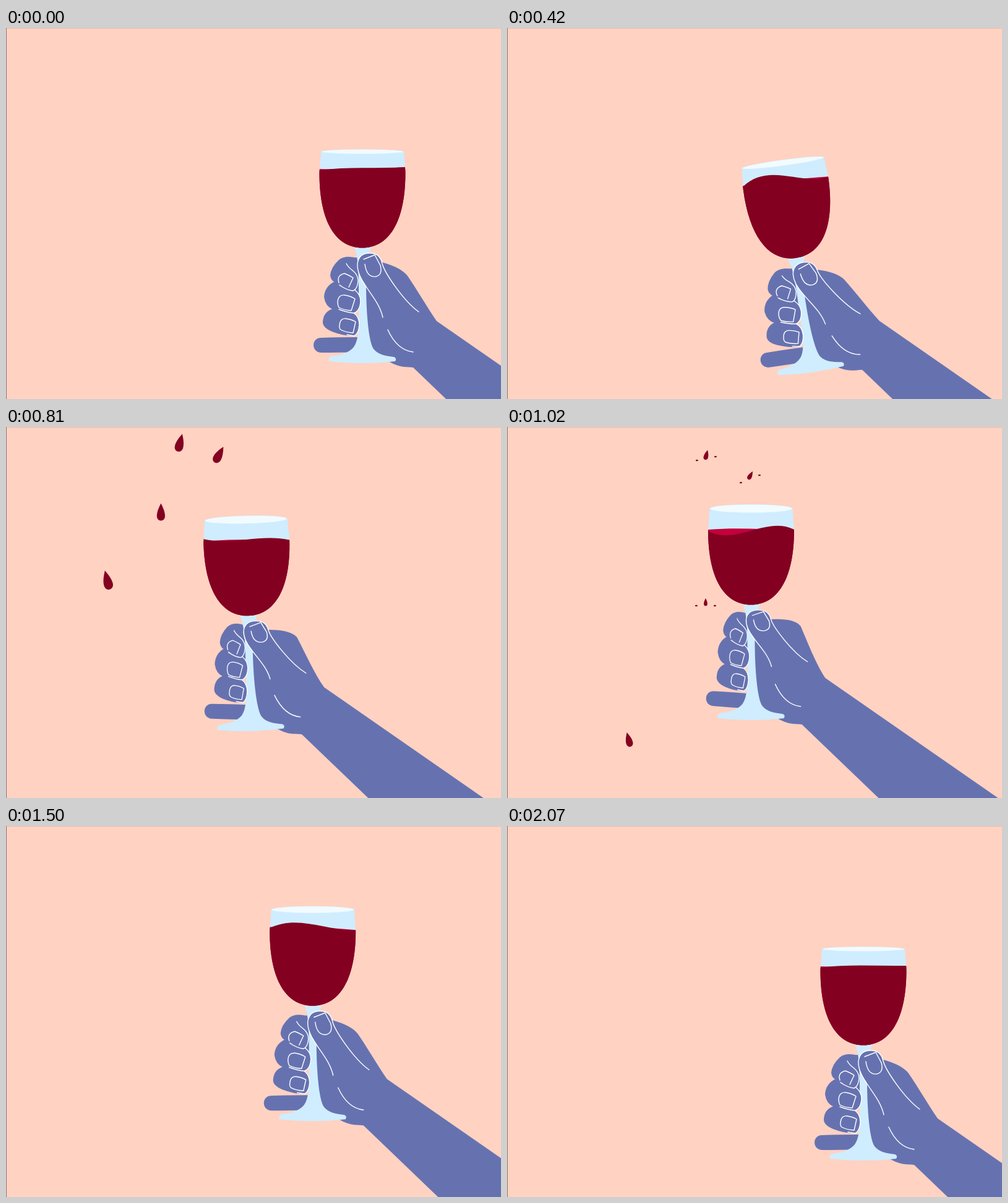
These frames come from a looping animation (800x600 px, 2100 ms). An HTML page with a canvas:

```html
<!DOCTYPE html>
<html lang="en">
<head>
<meta charset="utf-8">
<title>Wine glass</title>
<style>
  html, body { margin: 0; width: 100%; height: 100%; overflow: hidden; background: #ffd2c2; }
  canvas { display: block; }
</style>
</head>
<body>
<canvas id="stage" width="800" height="600"></canvas>
<script>
const ctx = document.getElementById('stage').getContext('2d');
const LOOP = 2100, STEP = 30;
const SKIN = '#6672b0', GLASS = '#cfedfe', RIM = '#f2fbff', WINE = '#840021', BACK = '#c3003c';

const lerp = (a, b, q) => a + (b - a) * q;
const clamp = q => Math.min(1, Math.max(0, q));
const ease = q => (q = clamp(q), q * q * (3 - 2 * q));
const pulse = (t, from, peak, to) =>
  ease((t - from) / (peak - from)) * (1 - ease((t - peak) / (to - peak)));
const bezier = (a, b, c, d, u) => {
  const v = 1 - u;
  return v * v * v * a + 3 * v * v * u * b + 3 * v * u * u * c + u * u * u * d;
};

// time and place of the rim centre
const SWING = [
  [0, 576, 200], [420, 446, 218], [630, 387, 172], [1020, 394.5, 132],
  [1260, 416, 114], [1710, 558, 164], [2070, 576, 199]
];

// Monotone cubic path through the key points
function swing(t, c) {
  const last = SWING.length - 1;
  const slope = k => (SWING[k + 1][c] - SWING[k][c]) / (SWING[k + 1][0] - SWING[k][0]);
  const tangent = k => {
    if (k === 0 || k === last) return 0;
    const a = slope(k - 1), b = slope(k);
    return a * b <= 0 ? 0 : Math.sign(a) * Math.min(Math.abs(a + b) / 2, 3 * Math.abs(a), 3 * Math.abs(b));
  };
  let i = 0;
  while (i < last - 1 && t >= SWING[i + 1][0]) i++;
  const [p, n] = [SWING[i], SWING[i + 1]], h = (n[0] - p[0]) / 3;
  return bezier(p[c], p[c] + tangent(i) * h, n[c] - tangent(i + 1) * h, n[c], clamp((t - p[0]) / h / 3));
}

// Shapes are drawn around an upright glass whose rim centre is 576, 200
const shape = d => new Path2D(d);
const palm = c => shape(`M552 372L570 371L608 379Q${638 + 8 * c} ${387 - 10 * c} ${649 + 7 * c} ${401 - 11 * c}
  C${664 + 3 * c} ${423 - 8 * c} 681 452 696 474L658 549C644 548 636 549 620 540L576 532L574 440L552 400Z`);
const littleFinger = shape('M509 501Q535 500 572 500V524Q535 525 510 525C493 525 493 501 509 501Z');
const bowl = shape('M509 200L507.5 222Q506.5 229 506.5 235C506.5 315 534 355.500 576 355.500C618 355.500 645.500 315 645.500 235Q645.500 229 644.500 222L643 200Z');
const stem = shape('M562 352C569 370 570 390 570 420V480C569 502 566 514 558 520C548 528 533 530 525 531Q520 534 522 539Q548 542 576 542Q604 542 629 539Q632 534 627 532C612 530 601 528 594 519C586 508 582 460 582 415C582 390 584 372 591 352Z');
const fingers = shape(
  'M566 372C556 369 545 369 538 375Q525 387 524 400Q525 408 531 411L560 425Q568 423 569 409Q568 399 561 392Z' +
  'M531 410Q515 418 514 435Q516 450 528 455L562 461Q573 456 573 442Q572 430 564 424L540 416Z' +
  'M528 454Q513 459 512 475Q511 484 527 491Q545 498 561 498Q571 494 571 480Q570 466 562 461L540 456Z');
const fingerLines = shape(
  'M550 381Q553 387 560 392Q569 399 569 409Q568 422 561 425Q551 424 539 416' +
  'M564 424Q573 431 573 442Q572 458 562 461Q551 460 538 455' +
  'M562 461Q571 467 571 480Q570 494 563 498L551 496' +
  'M538 412Q534 400 547 397Q553 399 561 404L554 419' +
  'M536 443Q537 431 547 432Q556 433 564 438L558 457Q545 456 538 452Q536 448 536 443Z' +
  'M539 481Q540 469 549 470Q558 471 565 475L561 493Q548 492 541 488Q538 485 539 481Z');
const thumbEdge = 'M609 468C604 446 589 430 580 415Q567 396 568 381C570 366 580 364 588 364C600 364 606 371 608 381C612 396 642 441 667 459';
const thumb = shape(thumbEdge);
const thumbLines = shape(thumbEdge + 'M578 374L596 367L605 384Q609 399 598 402Q583 404 580 382');
const wristLine = shape('M617 488Q632 521 658 524');
const drop = shape('M0 -1.4C.25 -.9 .6 -.2 .58 .45C.55 1.3 -.55 1.3 -.58 .45C-.6 -.2 -.25 -.9 0 -1.4Z');

// Where each drop of the broken stream ends up, and its size there
const DROPS = [[197, 507, 9.5], [321, 284, 5], [322, 46, 6.5], [393, 79, 6]];

function fill(path, color) {
  ctx.fillStyle = color;
  ctx.fill(path);
}

function lines(path) {
  ctx.strokeStyle = '#fff';
  ctx.lineWidth = 1.4;
  ctx.lineCap = ctx.lineJoin = 'round';
  ctx.stroke(path);
}

function ellipse(x, y, rx, ry, color) {
  ctx.beginPath();
  ctx.ellipse(x, y, rx, ry, 0, 0, 7);
  ctx.fillStyle = color;
  ctx.fill();
}

function moved(paint, ...steps) {
  ctx.save();
  for (const [how, ...args] of steps) ctx[how](...args);
  paint();
  ctx.restore();
}

function liquid(left, a, b, right, color) {
  ctx.beginPath();
  ctx.moveTo(506, 200 + left);
  ctx.bezierCurveTo(553, 200 + a, 599, 200 + b, 646, 200 + right);
  ctx.lineTo(646, 360);
  ctx.lineTo(506, 360);
  ctx.fillStyle = color;
  ctx.fill();
}

// The surface sloshes to and fro and is pulled over the lip by the spill
function drawWine(t, curl) {
  const slosh = 4 + 29 * pulse(t, 0, 420, 720) - 37 * pulse(t, 630, 1020, 1250) + 17 * pulse(t, 1050, 1500, 2100);
  const spill = pulse(t, 470, 630, 850);
  const left = 30 + 6 * curl, right = 25 + 9 * Math.sqrt(Math.sin(Math.PI * t / LOOP)) + 10 * spill;
  liquid(left - 2 + 8 * spill, 30 + 10 * spill, 28 + 6 * curl, right, BACK);
  liquid(left - 57 * spill, 28 - slosh + 10 * spill, 26 + .45 * slosh + 30 * spill, right, WINE);
}

const streamAt = u => [bezier(352, 318, 262, 221, u), bezier(212, 140, 138, 167, u)];
const streamRadius = u => 16.5 - 3.5 * Math.cos(2 * Math.PI * (u - .25)) + 8 * (1 - u) ** 8;

// Drops leave the stream at even distances and fall in arcs
function dropShift(i, t) {
  const [x, y] = streamAt(1 - .2 * i), [endX, endY] = DROPS[i];
  let q = Math.max(0, (t - 630) / 390);
  if (q > 1 && i) q = 1 + (q - 1) * .3;
  const arc = 4 * q * (1 - q);
  return [(endX - x) * q - (46 - 15 * i) * arc, (endY - y) * q - 75 * arc];
}

function drawStream(t, x, y) {
  const grow = clamp((t - 470) / 160), thin = clamp(1 - (t - 630) / 120);
  if (!grow || !thin) return;
  const shiftAt = i => i > 3 || t <= 630 ? [x - 387, y - 172] : dropShift(i, t);
  for (let u = 0; u <= grow; u += .01) {
    const [px, py] = streamAt(u), i = Math.min(4, (1 - u) * 5), k = Math.floor(i);
    const a = shiftAt(k), b = shiftAt(k + 1), r = streamRadius(u) * thin;
    ellipse(px + lerp(a[0], b[0], i - k), py + lerp(a[1], b[1], i - k), r, r, WINE);
  }
}

function drawDrops(t) {
  if (t <= 630) return;
  DROPS.forEach(([endX, endY, size], i) => {
    const r = lerp(14, size, ease((t - 690) / 330)) * (1 - ease((t - 1020) / 150));
    const [x, y] = streamAt(1 - .2 * i), [dx, dy] = dropShift(i, t);
    moved(() => fill(drop, WINE), ['translate', x + dx, y + dy], ['rotate', .25 * (i - 1)], ['scale', r, r]);

    // a few specks drift away from every drop but the falling one
    if (!i || t < 930 || t > 1300) return;
    const q = (t - 1020) / 240, speck = lerp(1.7, .9, clamp(q));
    for (const side of [-1, 1]) {
      const px = endX + side * lerp(15, 5, q) - 35 * q;
      const py = lerp(endY, 110, .15 * q) + 5 - side * (i - 1) * 3;
      ellipse(px, py, speck * 1.2, speck * .8, WINE);
    }
  });
}

// The forearm keeps its direction while the wrist follows the glass
function drawArm(x, y, angle) {
  const place = (px, py) => {
    const c = Math.cos(angle), s = Math.sin(angle), u = px - 576, v = py - 200;
    return [x + u * c - v * s, y + u * s + v * c];
  };
  const top = place(696, 474), low = place(658, 549);
  ctx.beginPath();
  for (const p of [place(630, 480), top, [top[0] + 400, top[1] + 278],
    [low[0] + 400, low[1] + 384], low]) ctx.lineTo(...p);
  ctx.fillStyle = SKIN;
  ctx.fill();
}

function drawHandAndGlass(t, curl) {
  moved(() => fill(littleFinger, SKIN),
    ['translate', 576 + 6 * curl, 512], ['rotate', curl * .087], ['translate', -576, -512]);
  fill(palm(curl), SKIN);
  fill(stem, GLASS);
  fill(bowl, GLASS);

  const rim = 3.8 + 3.2 * Math.sin(Math.PI * t / LOOP) ** 2;
  ellipse(576, 200, 67, rim, GLASS);
  ellipse(576, 200, 66, rim - .4, RIM);
  moved(() => drawWine(t, curl), ['clip', bowl]);

  moved(() => {
    fill(fingers, SKIN);
    lines(fingerLines);
  }, ['translate', 576, -3 * curl], ['scale', 1 - .13 * curl, 1], ['translate', -576, 0]);

  moved(() => {
    fill(thumb, SKIN);
    lines(thumbLines);
  }, ['translate', 0, 364], ['scale', 1, 1 - .12 * curl], ['translate', 0, -364]);
  moved(() => lines(wristLine), ['translate', -2 * curl, -4 * curl]);
}

function draw(t) {
  const x = swing(t, 1), y = swing(t, 2);
  const angle = -7.7 * pulse(t, 0, 420, 950) * Math.PI / 180;
  const curl = pulse(t, 360, 1020, 1500);
  ctx.fillStyle = '#ffd2c2';
  ctx.fillRect(0, 0, 800, 600);

  drawArm(x, y, angle);
  moved(() => drawHandAndGlass(t, curl), ['translate', x, y], ['rotate', angle], ['translate', -576, -200]);
  drawStream(t, x, y);
  drawDrops(t);

  ctx.fillStyle = '#e6bdaf';
  ctx.fillRect(0, 0, 800, 1);
  ctx.fillStyle = '#8c7168';
  ctx.fillRect(0, 0, 1, 600);
}

const start = performance.now();
function tick() {
  const t = (performance.now() - start) % LOOP;
  draw(Math.floor(t / STEP) * STEP);
  requestAnimationFrame(tick);
}
tick();
</script>
</body>
</html>
```
